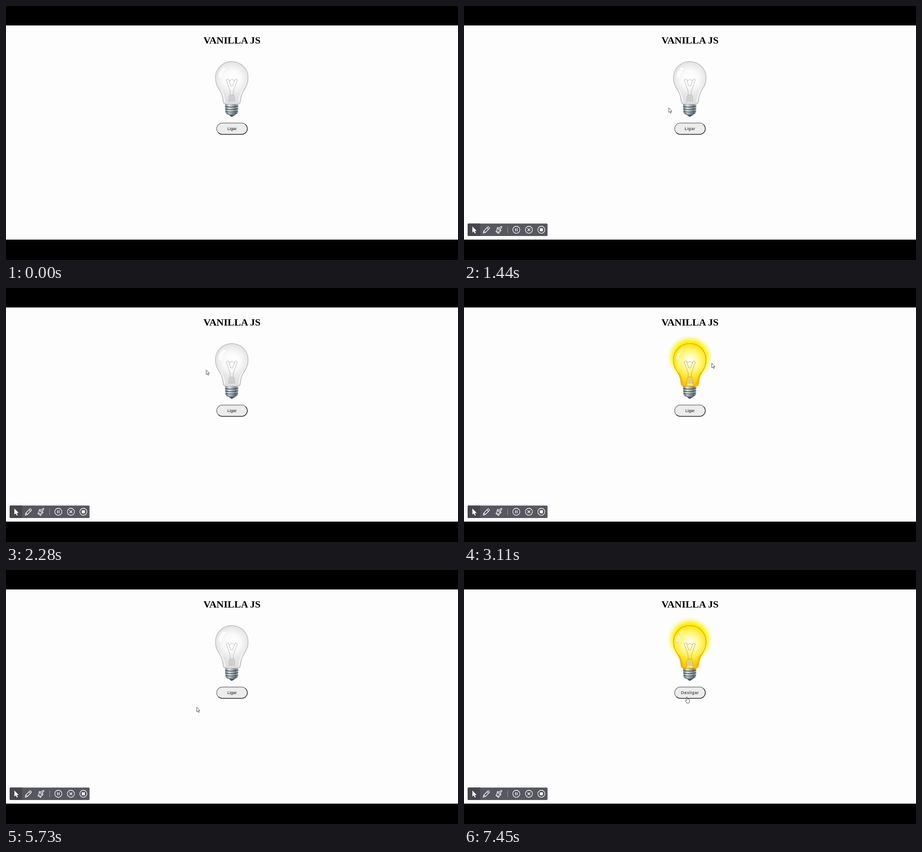
An HTML page that plays this animation: 998 px wide and 561 px high, repeating every 8000 ms.

```html
<!DOCTYPE html>
<html lang="pt">
<head>
<meta charset="utf-8">
<title>Lâmpada</title>
<style>
  html, body { margin: 0; height: 100%; overflow: hidden; background: #000; }
  svg { display: block; width: 100vw; height: 100vh; }
  .title { font: bold 22px "Liberation Serif", serif; }
  .label { font: 9.3px "Liberation Sans", sans-serif; fill: #111; }
  .title, .label { text-anchor: middle; }
  .anim { animation: 8s linear infinite; }
  .hard { animation-timing-function: step-end; }

  #toolbar, #pointer { animation-name: appear; }
  #mouse { animation-name: travel; }
  #arrow { animation-name: arrow; }
  #hand  { animation-name: hand; }
  #lit   { animation-name: lit; }
  #unlit { animation-name: unlit; }
  #on  { animation-name: on; }
  #off { animation-name: off; }
  .label { animation-name: spacing; }

  @keyframes appear { 0% { opacity: 0 } 1%, 100% { opacity: 1 } }
  @keyframes arrow { 0%, 17.4% { opacity: 1 } 8%, 78.5%, 100% { opacity: 0 } }
  @keyframes hand { 0%, 17.4% { opacity: 0 } 8%, 78.5%, 100% { opacity: 1 } }
  @keyframes lit { 0%, 60.625% { opacity: 0 } 33.75%, 84%, 100% { opacity: 1 } }
  @keyframes unlit { 0%, 60.625% { opacity: 1 } 33.75%, 84%, 100% { opacity: 0 } }
  @keyframes on { 0% { opacity: 0 } 84%, 100% { opacity: 1 } }
  @keyframes off { 0% { opacity: 1 } 84%, 100% { opacity: 0 } }
  @keyframes spacing {
    0%, 8% { letter-spacing: 0 }
    11%, 17.5% { letter-spacing: .72px }
    21%, 78.5% { letter-spacing: 0 }
    82%, 100% { letter-spacing: .72px }
  }
  @keyframes travel {
    0%, 1% { transform: translate(420px, 420px) }
    6% { transform: translate(462px, 304px) }
    8% { transform: translate(474px, 282px) }
    10.25% { transform: translate(482px, 275px) }
    14.5% { transform: translate(480px, 272px) }
    17.25% { transform: translate(462px, 250px) }
    18% { transform: translate(452px, 225px) }
    21.5% { transform: translate(446px, 195px) }
    28.5% { transform: translate(442px, 181px) }
    33.25% { transform: translate(449px, 177px) }
    36% { transform: translate(536px, 167px); animation-timing-function: step-end }
    38.875% { transform: translate(547px, 166px); animation-timing-function: step-end }
    40.625% { transform: translate(544px, 168px); animation-timing-function: step-end }
    43.75% { transform: translate(538px, 170px); animation-timing-function: step-end }
    50.125% { transform: translate(531px, 171px); animation-timing-function: step-end }
    55% { transform: translate(526px, 171px); animation-timing-function: step-end }
    60.625% { transform: translate(423px, 301px); animation-timing-function: step-end }
    71.625% { transform: translate(421px, 303px); animation-timing-function: step-end }
    73.75% { transform: translate(424px, 302px) }
    78.5% { transform: translate(472px, 284px) }
    82% { transform: translate(489px, 278px) }
    91.25%, 100% { transform: translate(491px, 280px) }
  }
</style>
</head>
<body>
<svg viewBox="0 0 998 561" preserveAspectRatio="none">
  <defs>
    <path id="glass" d="M498.5 122.7C478.500 122.700 462.400 138.500 462.400 158.500C462.400 174 469 181 474 190C479 199 478 206 480 213Q481 216.500 486 217H511Q516 216.500 517 213C519 206 518 199 523 190C528 181 534.600 174 534.600 158.500C534.600 138.500 518.500 122.700 498.500 122.700Z"/>
    <radialGradient id="clear" gradientUnits="userSpaceOnUse" cx="499" cy="161" r="54">
      <stop offset="0" stop-color="#fff"/>
      <stop offset=".35" stop-color="#fafafa"/>
      <stop offset=".66" stop-color="#e6e6e6"/>
      <stop offset="1" stop-color="#dedede"/>
    </radialGradient>
    <radialGradient id="amber" gradientUnits="userSpaceOnUse" cx="498.500" cy="161" r="56">
      <stop offset="0" stop-color="#fff"/>
      <stop offset=".2" stop-color="#fffcc8"/>
      <stop offset=".45" stop-color="#fff56e"/>
      <stop offset=".66" stop-color="#ffe51c"/>
      <stop offset="1" stop-color="#f7b90c"/>
    </radialGradient>
    <radialGradient id="halo">
      <stop offset=".68" stop-color="#fff000"/>
      <stop offset=".8" stop-color="#fff52e" stop-opacity=".72"/>
      <stop offset=".9" stop-color="#fff85a" stop-opacity=".32"/>
      <stop offset="1" stop-color="#fffa90" stop-opacity="0"/>
    </radialGradient>
    <linearGradient id="steel">
      <stop offset="0" stop-color="#59646a"/>
      <stop offset=".3" stop-color="#dce3e6"/>
      <stop offset=".55" stop-color="#98a4aa"/>
      <stop offset=".8" stop-color="#5d6a71"/>
      <stop offset="1" stop-color="#a3adb2"/>
    </linearGradient>
    <linearGradient id="bevel" gradientUnits="userSpaceOnUse" x1="498.700" y1="269.750" x2="499.300" y2="271.750">
      <stop offset="0" stop-color="#777"/>
      <stop offset="1" stop-color="#1c1c1c"/>
    </linearGradient>
    <g id="filament" fill="none" stroke-width=".8">
      <path d="M486 163L495 188V198M511 163L502 188V198M486 163L491 161L494 165L499 162L504 165L507 161L511 163M492 164L496 176L500 177L505 164"/>
      <path d="M492.500 212V199Q498.500 194 504.500 199V212M495.500 199V211M498.500 198V212M501.500 199V211" stroke-width="1"/>
    </g>
  </defs>

  <rect y="43" width="998" height="473" fill="#fdfdfd"/>
  <text class="title" x="499" y="83">VANILLA JS</text>

  <g id="unlit" class="anim hard">
    <use href="#glass" fill="url(#clear)" stroke="#b9b9be" stroke-width="1.400"/>
    <path d="M469 157Q470 143 480 135L486 138Q477 146 476 160Z" fill="#fff" opacity=".75"/>
    <path d="M474 184Q482 198 483 213M523 184Q515 198 514 213" fill="none" stroke="#f8f8f8" stroke-width="2"/>
    <use href="#filament" stroke="#a5a5a5"/>
  </g>
  <g id="lit" class="anim hard">
    <ellipse cx="498.500" cy="153" rx="51" ry="50" fill="url(#halo)"/>
    <use href="#glass" fill="url(#amber)" stroke="#edac0c" stroke-width="1.800"/>
    <path d="M474 187Q481 198 482 212M523 187Q516 198 515 212" fill="none" stroke="#f5aa0c" stroke-width="3" opacity=".6"/>
    <path d="M468 157Q469 148 473 143L477 146Q474 151 474 158ZM475 140Q479 135 484 133L482 139L478 144Z" fill="#fffce0" opacity=".85"/>
    <path d="M492 198H505V216H492Z" fill="#fff4a8" opacity=".7"/>
    <use href="#filament" stroke="#aa9b55"/>
  </g>

  <path d="M484 217.500H513L512 236L504 242L498.500 244.500L493 242L485 236Z" fill="url(#steel)"/>
  <path d="M484 222Q499 225 513 221M484 227.500Q499 230.500 513 226.500M484.500 233Q499 236 512.500 232M487 238Q499 240.500 510 237" fill="none" stroke="#414c53" stroke-width="1.300"/>
  <path d="M484 219.500Q499 222 513 218.500M484 225Q499 228 513 224M484 230.500Q499 233.500 513 229.500" fill="none" stroke="#e5eaec" stroke-width=".8" opacity=".7"/>
  <path d="M492 241H505L498.500 244.700Z" fill="#343b40"/>

  <rect x="465.200" y="258.500" width="67.600" height="25" rx="12.500" fill="#ececec" stroke="url(#bevel)" stroke-width="1.500"/>
  <g id="off" class="anim hard"><text class="label anim" x="499" y="274">Ligar</text></g>
  <g id="on" class="anim hard"><text class="label anim" x="499" y="274">Desligar</text></g>

  <g id="toolbar" class="anim hard">
    <rect x="8" y="480.500" width="176.500" height="27.500" rx="2" fill="#575760"/>
    <path d="M10 480.500H35.500V508H10Q8 508 8 506V482.500Q8 480.500 10 480.500Z" fill="#46464c"/>
    <path d="M18.500 487V500.500L21.500 497.800L24 502.500L26 501.500L23.800 496.800H28Z" fill="#fff"/>
    <g fill="none" stroke="#fff" stroke-width="1.300" stroke-linejoin="round">
      <path d="M42.500 502L43.700 497L52.500 488Q53.500 487 54.700 488.200L55.800 489.400Q56.800 490.500 55.800 491.500L47 500.500ZM50.700 490L54 493.300M43.700 497L47 500.500"/>
      <path d="M77.500 491L81.500 487Q82.500 486.200 83.300 487Q84.100 488 83.300 489L79.500 493L82 495.500L80.500 497L73 490.500L74.800 489ZM73.500 492L70.500 498.500L76.500 502.500L80 497M72.500 499.500L74.500 496.500M75 501L77 497.500"/>
      <path d="M96.500 487V502" stroke="#9b9ba1" stroke-width="1"/>
      <circle cx="115.500" cy="494.300" r="7.800"/>
      <path d="M113.700 491V497.600M117.300 491V497.600" stroke-width="1.500"/>
      <circle cx="143.300" cy="494.300" r="7.800"/>
      <path d="M140.300 491.300L146.300 497.300M146.300 491.300L140.300 497.300"/>
      <circle cx="170.800" cy="494.300" r="7.800"/>
      <rect x="167.500" y="491" width="6.600" height="6.600" rx=".5" fill="#fff" stroke="none"/>
    </g>
  </g>

  <g id="pointer" class="anim hard">
    <g id="mouse" class="anim" fill="#fff" stroke="#333340" stroke-width=".9" stroke-linejoin="round">
      <path id="arrow" class="anim hard" d="M0 0V10.200L2.400 8.100L4 11.700L5.700 11L4.200 7.500H7.100Z"/>
      <path id="hand" class="anim hard" d="M0 1Q1 -.3 2 1V5Q3 4.300 3.800 5.300Q4.900 4.800 5.500 5.900Q7 5.600 7 7.300V10Q6.500 12 5.500 14H.7Q0 11.500 -2 9.200Q-2.300 7.800 -1 7.800L0 8.500Z"/>
    </g>
  </g>
</svg>
</body>
</html>
```
